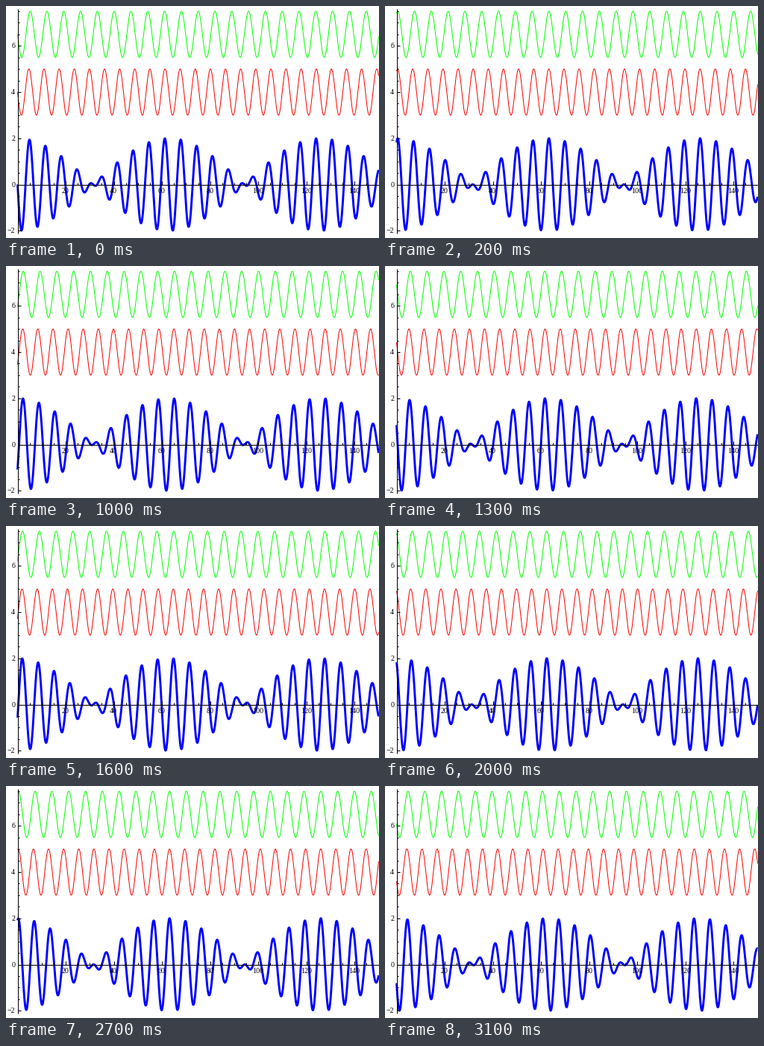
A matplotlib script that plays this animation: 500 by 310 pixels, repeating every 3200 ms.

```python
import numpy as np
import matplotlib.pyplot as plt
from matplotlib.animation import FuncAnimation

W, H, DPI = 500, 310, 100
FRAMES, STEP = 32, 100
PX = 72 / DPI                      # one pixel in points
X0, Y0 = 15.5, 238.5               # axes crossing in pixels
SX, SY = 484 / 150, 30.87          # pixels per unit


def px(x):
    return X0 + SX * x


def py(y):
    return Y0 - SY * y


fig = plt.figure(figsize=(W / DPI, H / DPI), dpi=DPI, facecolor="white")
ax = fig.add_axes([0, 0, 1, 1])
ax.set_xlim(0, W)
ax.set_ylim(H, 0)
ax.axis("off")

x = np.linspace(0, 150, 3001)


def curve(color, width):
    line, = ax.plot([], [], color=color, lw=width * PX, solid_capstyle="butt",
                    solid_joinstyle="round", zorder=2)
    return line


green = curve("#00ff00", 1)
red = curve("#ff0000", 1)
blue = curve("#0000ff", 2.9)


def stroke(xs, ys):
    ax.plot(xs, ys, color="black", lw=PX, solid_capstyle="butt",
            snap=True, zorder=3)


def label(x, y, text, **align):
    ax.text(x, y, text, family="Liberation Serif", fontsize=10 * PX,
            color="black", zorder=4, **align)


stroke([X0, 500], [Y0, Y0])
stroke([X0, X0], [4, 304])

for v in range(5, 150, 5):
    major = v % 20 == 0
    stroke([px(v)] * 2, [Y0, Y0 - (4.5 if major else 2.5)])
    if major:
        label(px(v) - 0.3, 250, str(v), ha="center", va="baseline")

for half in range(-4, 16):
    v = half / 2
    major = half % 4 == 0
    stroke([X0, X0 + (4.5 if major else 2.5)], [py(v)] * 2)
    if major:
        label(12.3, py(v) + 3, f"{v:.0f}".replace("-", "\u2212"),
              ha="right", va="baseline")


def draw(i):
    a = np.sin(i - x)
    b = np.sin(i - 0.9 * x)
    for line, y in ((red, 4 + a), (green, 6.5 + b), (blue, a + b)):
        line.set_data(px(x), py(y))
    return red, green, blue


def init():
    return draw(0)


anim = FuncAnimation(fig, draw, frames=FRAMES, init_func=init,
                     interval=STEP, repeat=True, repeat_delay=0, blit=False)
plt.show()
```
